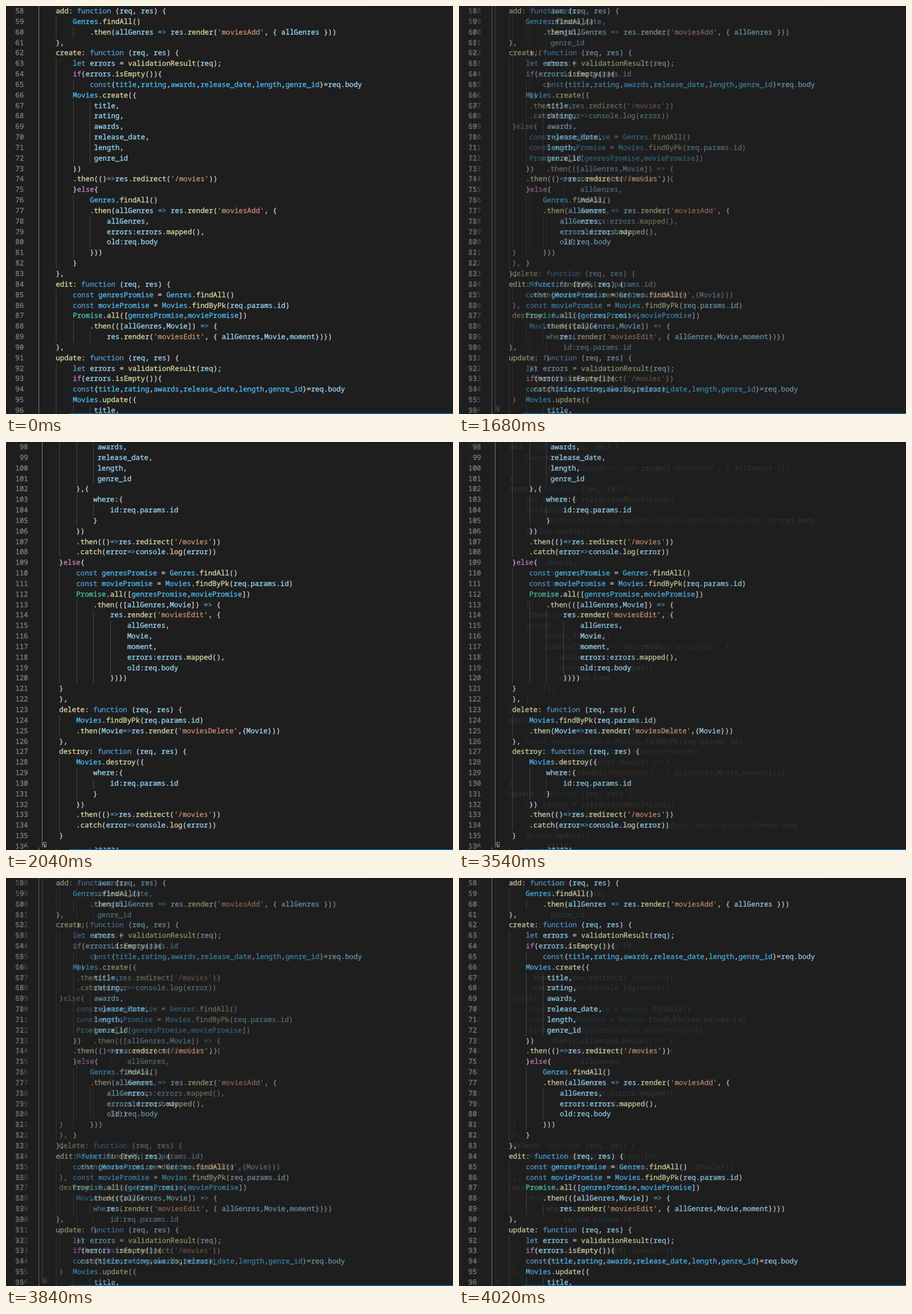
Animation of 673x615 px, one loop 4.08 s. Source, as an HTML page:

```html
<!DOCTYPE html>
<html lang="en">
<head>
<meta charset="utf-8">
<title>Code crossfade</title>
<style>
  html, body { margin: 0; width: 100%; height: 100%; overflow: hidden; background: #1e1e1e; }
  .page {
    position: absolute; left: 0; top: 0; width: 673px; height: 615px;
    overflow: hidden; background: #1e1e1e; color: #d4d4d4;
    font: 10.68px/16px "Noto Sans Mono", "DejaVu Sans Mono", monospace;
    font-variant-ligatures: none; text-rendering: geometricPrecision;
    -webkit-text-stroke: 0.25px;
  }
  #second { height: 611px; opacity: 0; }
  .page > * { position: absolute; white-space: pre; }
  .num { left: 14px; color: #858585; }
  .guide { width: 1px; height: 16px; background: #404040; }
  .guide.active { background: #707070; }
  .match { left: 54px; top: 603px; width: 5px; height: 12px; border: 1px solid #888; }
  .bar, .shadow { position: absolute; right: 0; height: 1px; }
  .bar { left: 95px; top: 614px; background: #007acc; }
  .shadow { left: 543px; top: 0; background: #141414; }
  .string { color: #ce9178; }
  .keyword { color: #569cd6; }
  .control { color: #c586c0; }
  .type { color: #4ec9b0; }
  .func { color: #dcdcaa; }
  .const { color: #4fc1ff; }
  .name { color: #9cdcfe; }
</style>
</head>
<body>
<div class="page" id="first"></div>
<div class="page" id="second"><div class="match"></div></div>
<div class="shadow"></div>
<div class="bar"></div>
<script>
const CHAR = 6.408, ROW = 15.84;

const firstCode = `
    add: function (req, res) {
        Genres.findAll()
            .then(allGenres => res.render('moviesAdd', { allGenres }))
    },
    create: function (req, res) {
        let errors = validationResult(req);
        if(errors.isEmpty()){
            const{title,rating,awards,release_date,length,genre_id}=req.body
        Movies.create({
             title,
             rating,
             awards,
             release_date,
             length,
             genre_id
        })
        .then(()=>res.redirect('/movies'))
        }else{
            Genres.findAll()
            .then(allGenres => res.render('moviesAdd', {
                allGenres,
                errors:errors.mapped(),
                old:req.body
            }))
        }
    },
    edit: function (req, res) {
        const genresPromise = Genres.findAll()
        const moviePromise = Movies.findByPk(req.params.id)
        Promise.all([genresPromise,moviePromise])
            .then(([allGenres,Movie]) => {
                res.render('moviesEdit', { allGenres,Movie,moment})})
    },
    update: function (req, res) {
        let errors = validationResult(req);
        if(errors.isEmpty()){
        const{title,rating,awards,release_date,length,genre_id}=req.body
        Movies.update({
             title,`;

const secondCode = `
             awards,
             release_date,
             length,
             genre_id
        },{
            where:{
                id:req.params.id
            }
        })
        .then(()=>res.redirect('/movies'))
        .catch(error=>console.log(error))
    }else{
        const genresPromise = Genres.findAll()
        const moviePromise = Movies.findByPk(req.params.id)
        Promise.all([genresPromise,moviePromise])
            .then(([allGenres,Movie]) => {
                res.render('moviesEdit', {
                    allGenres,
                    Movie,
                    moment,
                    errors:errors.mapped(),
                    old:req.body
                })})
    }
    },
    delete: function (req, res) {
        Movies.findByPk(req.params.id)
        .then(Movie=>res.render('moviesDelete',{Movie}))
    },
    destroy: function (req, res) {
        Movies.destroy({
            where:{
                id:req.params.id
            }
        })
        .then(()=>res.redirect('/movies'))
        .catch(error=>console.log(error))
    }
}`;

const kinds = ['string', 'keyword', 'control', 'type', 'func', 'const', 'name'];
const token = /('[^']*')|(=>|\b(?:const|let|function)\b)|\b(if|else)\b|\b(Promise)\b|(\w+(?=\(|: f))|(\b(?:Genres|Movies|genresPromise|moviePromise)\b|(?<=const\{[\w,]*)\w+)|(\w+)/g;

function highlight(line) {
  return line.replace(token, (text, ...groups) => {
    const kind = kinds[groups.findIndex(g => g !== undefined)];
    return `<span class="${kind}">${text.replace('>', '&gt;')}</span>`;
  });
}

function fillPage(page, code, firstNumber, left, digits) {
  const add = (className, x, y, html = '') => {
    const el = document.createElement('div');
    el.className = className;
    el.style.left = x + 'px';
    el.style.top = y + 'px';
    el.innerHTML = html;
    page.append(el);
  };
  code.slice(1).split('\n').forEach((line, i) => {
    const y = Math.round(i * ROW);
    const indent = line.search(/\S/);
    for (let col = 0; col < indent; col += 4)
      add(col ? 'guide' : 'guide active', Math.round(left + col * CHAR), y);
    add('num', 14, y, String(firstNumber + i).padStart(digits));
    add('code', left, y, highlight(line));
  });
}

const first = document.getElementById('first');
const second = document.getElementById('second');
fillPage(first, firstCode, 58, 49.3, 2);
fillPage(second, secondCode, 98, 54.4, 3);

// Each crossfade runs in 60 ms steps of one tenth.
const fade = ms => Math.min(10, Math.max(0, Math.floor(ms / 60) + 1)) / 10;

const start = performance.now();
function draw() {
  const t = (performance.now() - start) % 4080;
  second.style.opacity = fade(t - 1500) - fade(t - 3540);
  requestAnimationFrame(draw);
}
draw();
</script>
</body>
</html>
```
